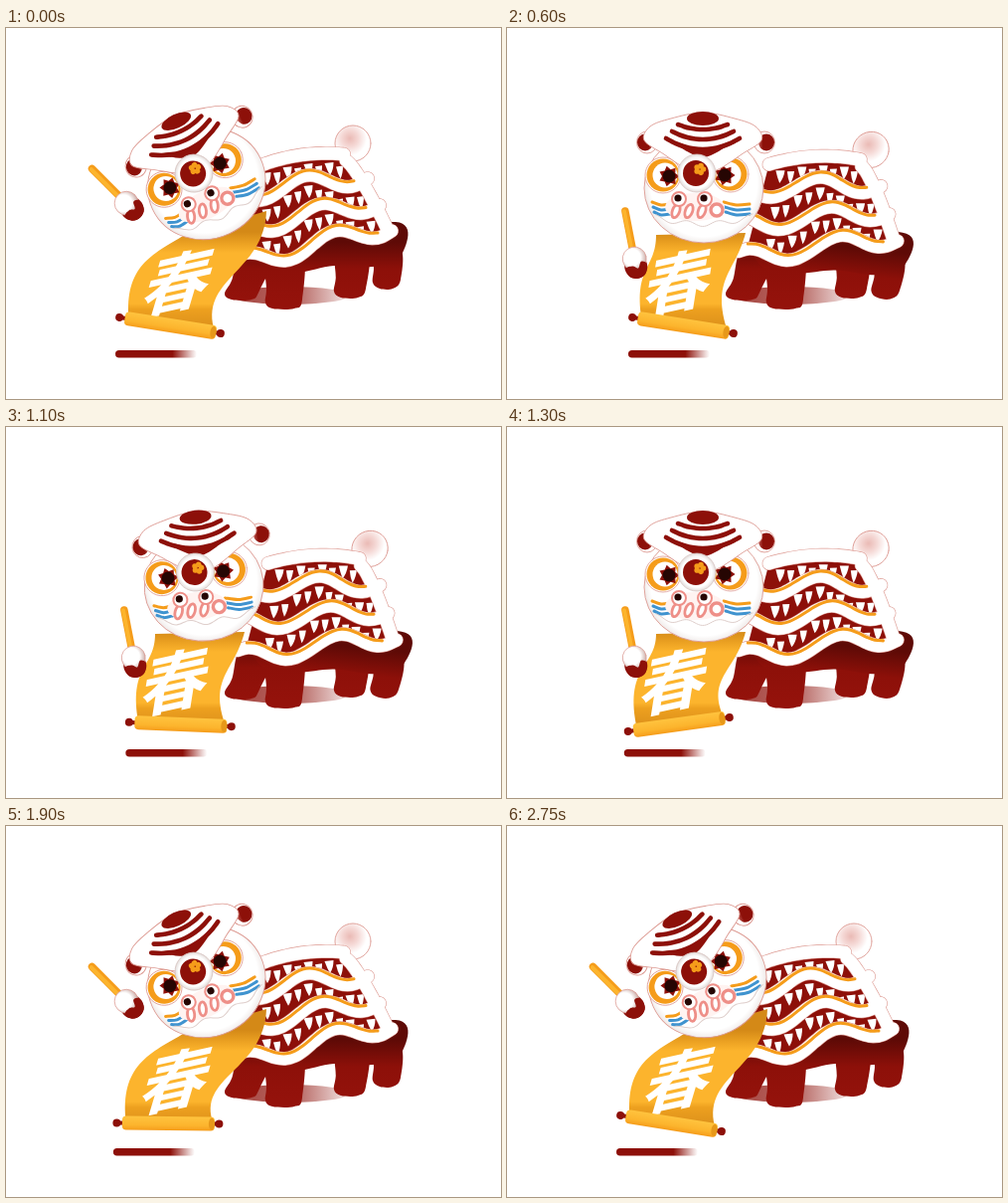
An HTML page with a canvas for the animation above (2800 ms loop, 498 px wide and 373 px high).

```html
<!DOCTYPE html>
<html lang="zh">
<head>
<meta charset="utf-8">
<title>Lion dance</title>
<style>
  html, body { margin: 0; width: 100%; height: 100%; overflow: hidden; background: #fff; }
  canvas { display: block; width: 498px; height: 373px; }
</style>
</head>
<body>
<canvas id="stage" width="498" height="373"></canvas>
<script>
const ctx = document.getElementById('stage').getContext('2d');
const LOOP = 2800, STEP = 50, TAU = Math.PI * 2, DEG = Math.PI / 180;
const RED = '#8d1009', DARK = '#5e0a06', GOLD = '#fcb42d', ORANGE = '#f59c1a';
const PINK = '#ee8f88', RIM = '#dd9a92', BLUE = '#3f93cf', BLACK = '#260603';

const mix = (a, b, k) => a + (b - a) * k;

function ease(t, from, to) {
  const u = Math.min(1, Math.max(0, (t - from) / (to - from)));
  return u * u * (3 - 2 * u);
}

// The lion stands up, shakes its head once, and leans back; the scroll swings behind it.
function poseAt(t) {
  const up = ease(t, 0, 600) - ease(t, 1350, 1900);
  const headUp = ease(t, 0, 600) - ease(t, 1600, 1900);
  const shake = Math.sin(Math.PI * Math.min(1, Math.max(0, (t - 600) / 650))) ** 2;
  const swing = Math.exp(-(((t - 1520) / 370) ** 2));
  return { up, headUp, swing, headAngle: -25 * (1 - headUp) - 14 * shake, rollX: 165 + 12 * up - 6 * swing };
}

function group(draw) {
  ctx.save();
  draw();
  ctx.restore();
}

function paint(fill, stroke, width = 1) {
  if (fill) { ctx.fillStyle = fill; ctx.fill(); }
  if (stroke) { ctx.strokeStyle = stroke; ctx.lineWidth = width; ctx.stroke(); }
}

// Smooth curve through points.
function curve(p, closed) {
  const n = p.length, at = i => closed ? p[(i + n) % n] : p[Math.max(0, Math.min(n - 1, i))];
  ctx.beginPath();
  ctx.moveTo(...p[0]);
  for (let i = 0; i < (closed ? n : n - 1); i++) {
    const [a, b, c, d] = [at(i - 1), at(i), at(i + 1), at(i + 2)];
    ctx.bezierCurveTo(b[0] + (c[0] - a[0]) / 6, b[1] + (c[1] - a[1]) / 6,
      c[0] - (d[0] - b[0]) / 6, c[1] - (d[1] - b[1]) / 6, c[0], c[1]);
  }
}

function blob(points, fill, stroke, width) { curve(points, true); paint(fill, stroke, width); }
function line(points, color, width) { curve(points); paint(null, color, width); }

function plot(from, to, f, count = 16) {
  return Array.from({ length: count + 1 }, (_, i) => {
    const x = mix(from, to, i / count);
    return [x, f(x)];
  });
}

function oval(x, y, rx, ry, fill, stroke, width) {
  ctx.beginPath();
  ctx.ellipse(x, y, rx, ry, 0, 0, TAU);
  paint(fill, stroke, width);
}
const disc = (x, y, r, fill, stroke, width) => oval(x, y, r, r, fill, stroke, width);

function shaded(gradient, stops) {
  stops.forEach(([at, color]) => gradient.addColorStop(at, color));
  return gradient;
}
const linear = (x0, y0, x1, y1, ...stops) => shaded(ctx.createLinearGradient(x0, y0, x1, y1), stops);
const radial = (x, y, r, ...stops) => shaded(ctx.createRadialGradient(x, y, 0, x, y, r), stops);

function drawShadows(x) {
  ctx.beginPath();
  ctx.roundRect(x, 324, 82, 7.5, 4);
  paint(linear(x, 0, x + 82, 0, [0, RED], [0.7, RED], [0.95, 'rgba(141,16,9,.15)'], [1, 'rgba(141,16,9,0)']));
  oval(285, 269, 60, 9, linear(225, 0, 345, 0, [0, 'rgba(141,16,9,.8)'], [0.6, 'rgba(141,16,9,.6)'], [1, 'rgba(141,16,9,.1)']));
}

function drawLeg(x, width, foot, lean, skin) {
  const left = x - lean, right = left + width;
  blob([[x, 222], [left + lean * 0.4, foot - 20], [left - 1, foot - 6], [left + 6, foot],
    [right - 8, foot], [right, foot - 9], [x + width, 222]], skin);
}

// Wavy hem of a tier of the coat; each lower tier is steeper and reaches further back.
const tierWave = k => x =>
  165 + 34 * k - (0.15 + 0.05 * k) * (x - 250) - 9 * Math.cos((x - 302 - 14 * k) / 90 * TAU);
const tierEnd = k => 364 + 12 * k;

function drawFringe(wave, from, to, drop) {
  for (let x = from, i = 0; x < to; x += 10.5, i++) {
    const y = wave(x) + drop + (i % 2 ? 3 : 0), s = 4.5 - i % 2;
    ctx.beginPath();
    ctx.moveTo(x - s, y - 4);
    ctx.lineTo(x + s, y - 5);
    ctx.quadraticCurveTo(x + s, y + 3, x + 1, y + 8);
    ctx.quadraticCurveTo(x - 2, y + 3, x - s, y - 4);
    paint('#fff');
  }
}

function drawBody(up) {
  const skin = linear(0, 215, 0, 275, [0, DARK], [0.45, RED], [1, '#94120b']);
  drawLeg(237, 34, 273, 16, skin);
  drawLeg(333, 31, 271, 2, skin);
  drawLeg(262, 36, 282, 0, skin);
  ctx.transform(1, 0.1 * up, -0.14 * up, 1, 0.14 * 238 * up, -0.1 * 285 * up);
  drawLeg(370, 27, 262, 0, skin);
  blob([[258, 222], [392, 195], [396, 232], [368, 240], [330, 239], [294, 246], [262, 246]], skin);

  const back = x => 126 + 0.0028 * (x - 322) ** 2;
  const spine = plot(250, 340, back);
  const side = plot(0, 1, u => u).map(([u]) => [342 + 42 * u ** 0.8, 133 + 70 * u]);
  ctx.beginPath();
  for (const p of [...spine, ...side, ...plot(tierEnd(2), 240, tierWave(2))]) ctx.lineTo(...p);
  paint(RED);
  disc(349, 116, 18, radial(346, 111, 19, [0, '#eabab5'], [0.45, '#f5d9d6'], [0.9, '#fff'], [1, '#fff']), RIM, 0.9);

  const edges = [spine, side];
  drawFringe(back, 262, 350, 14);
  for (let k = 0; k < 3; k++) {
    const wave = tierWave(k);
    if (k < 2) drawFringe(wave, 262, tierEnd(k) - 2, 15);
    const hem = plot(232, tierEnd(k), wave);
    edges.push(hem);
  }
  for (const e of edges) line(e, RIM, 14);
  for (const e of edges) line(e, '#fff', 12.8);
  for (let k = 0; k < 3; k++) line(plot(240, tierEnd(k) - 14, x => tierWave(k)(x) - 5), ORANGE, 3);
}

function drawBanner({ up, headUp, swing, rollX }) {
  const y = 299, angle = 9 - 24 * swing, sway = 4 * (1 - up) - 9 * swing;
  const c = Math.cos(angle * DEG), s = Math.sin(angle * DEG);
  const left = [rollX - 42 * c, y - 42 * s], right = [rollX + 46 * c, y + 46 * s];
  ctx.beginPath();
  ctx.moveTo(mix(180, 150, headUp), 208);
  ctx.bezierCurveTo(mix(146, 150, headUp), mix(228, 242, headUp), left[0] + sway - 8, 240, ...left);
  ctx.lineTo(...right);
  ctx.bezierCurveTo(right[0] - 18, 252, mix(260, 230, headUp), 246, mix(262, 240, headUp), mix(184, 206, headUp));
  ctx.closePath();
  paint(linear(0, 205, 0, 300, [0, '#d48917'], [0.13, '#eda323'], [0.22, GOLD], [0.76, GOLD], [0.82, '#eda01f'], [1, '#dd911b']));

  group(() => {
    ctx.translate(rollX + 9 - 13 * up, 256);
    ctx.transform(1, -0.22, mix(-0.3, -0.16, headUp), 1, 0, 0);
    ctx.font = '700 68px "Noto Sans CJK SC", "Noto Sans CJK", sans-serif';
    ctx.textAlign = 'center';
    ctx.fillStyle = '#fff';
    ctx.fillText('春', 0, 25);
  });

  ctx.translate(rollX, y);
  ctx.rotate(angle * DEG);
  line([[-51, 0], [51, 0]], RED, 4);
  for (const side of [-1, 1]) disc(side * 51.5, 0, 4, RED);
  ctx.beginPath();
  ctx.roundRect(-46, -7, 93, 14, 4);
  paint(linear(0, -7, 0, 7, [0, '#ffc33e'], [0.65, GOLD], [1, ORANGE]));
  oval(44, 0, 3, 6, '#e79819');
}

function drawEye(x, y, side) {
  disc(x, y, 18, '#fff', RIM, 0.8);
  disc(x, y, 16.5, ORANGE);
  disc(x + side * 2, y, 12.5, '#fff');
  const lashes = Array.from({ length: 14 }, (_, i) => {
    const r = i % 2 ? 7 : 10.5, a = i / 14 * TAU;
    return [x + side * 6 + r * Math.cos(a), y + 1 + r * Math.sin(a)];
  });
  ctx.beginPath();
  lashes.forEach(p => ctx.lineTo(...p));
  paint(RED);
  disc(x + side * 6, y + 1, 6.5, BLACK);
}

// White brows rising to two horns, with the striped hat between them.
function drawCrest() {
  const half = [[165, 91], [144, 99], [138, 113], [158, 127], [181, 142]];
  const mirrored = half.map(([x, y]) => [394 - x, y]).reverse();
  blob([[197, 85], ...half, [197, 146], ...mirrored], '#fff', RIM, 0.9);
  oval(197, 91, 16, 7, RED);
  for (let i = 0; i < 3; i++) {
    const w = 25 + 6 * i, y = 97 + 7 * i, sag = 5 + 3 * i;
    line(plot(-1, 1, u => u, 8).map(([u]) => [197 + w * u, y + sag * (1 - u * u)]), RED, 4.6);
  }
  blob([[168, 114], [197, 122], [226, 114], [213, 124], [197, 130], [181, 124]], RED);
}

function drawMuzzle() {
  for (const [x, width] of [[146, 18], [218, 26]]) {
    [ORANGE, BLUE, BLUE].forEach((color, i) => {
      const y = 175 + 5 * i;
      line([[x + i, y], [x + width / 2, y + 3], [x + width, y + 2]], color, 3);
    });
  }
  oval(189, 180, 30, 14, '#fff3f1');
  for (let i = 0; i < 3; i++) {
    group(() => {
      ctx.translate(170 + 13 * i, 184);
      ctx.rotate(0.35);
      oval(0, 0, 3.6, 7, '#fff', PINK, 2.8);
    });
  }
  disc(211, 183, 6, '#fff', PINK, 3.4);
  for (const x of [173, 199]) {
    disc(x, 172, 7, '#fff', PINK, 2);
    disc(x - 1, 171, 3.6, BLACK);
  }
  line(plot(150, 247, x => 197 + 2.5 * Math.cos((x - 197) / 32 * TAU) - ((x - 197) / 18) ** 2, 24), '#dfcfcc', 1);
}

function drawHead(angle) {
  ctx.translate(191 + angle * 0.06, 147);
  ctx.rotate(angle * DEG);
  ctx.translate(-191, -147);
  for (const side of [-1, 1]) {
    const x = 200 + side * 59;
    oval(x, 115, 10.5, 11, '#fff', RIM, 0.9);
    oval(x + side * 2, 115, 8, 8.5, linear(x - side * 8, 0, x + side * 5, 0, [0, '#cf7770'], [0.5, RED]));
  }
  oval(198, 161, 60, 55, radial(198, 156, 64, [0, '#fff'], [0.84, '#fff'], [1, '#e9e2e0']), RIM, 0.9);
  drawEye(157, 148, 1);
  drawEye(225, 147, -1);
  drawMuzzle();
  drawCrest();
  disc(191, 146, 19, radial(191, 146, 20, [0, '#fff'], [0.75, '#fff'], [1, '#ddd5d3']), '#d8c5c2', 0.8);
  disc(190, 146, 13, RED);
  for (let i = 0; i < 5; i++) disc(194 + 3.5 * Math.cos(i * TAU / 5), 142 + 3.5 * Math.sin(i * TAU / 5), 2.8, ORANGE);
}

function drawHand(up) {
  ctx.translate(mix(124, 129, up), mix(179, 236, up));
  ctx.rotate(mix(-45, -11, up) * DEG);
  line([[0, -13], [0, -53]], ORANGE, 7.5);
  line([[-1, -14], [-1, -53]], GOLD, 4);
  oval(0, 4, 11.5, 12, RED);
  disc(0, -4, 12, radial(-2, -6, 14, [0, '#fff'], [0.6, '#fff'], [1, '#cfb2ad']), RIM, 0.7);
  blob([[-10, 4], [-3, 3], [2, 6], [6, 0], [11, 3], [8, 13], [0, 16], [-8, 13]], RED);
}

function render(now) {
  const pose = poseAt(Math.floor(now % LOOP / STEP) * STEP);
  ctx.fillStyle = '#fff';
  ctx.fillRect(0, 0, 498, 373);
  ctx.lineCap = ctx.lineJoin = 'round';
  drawShadows(pose.rollX - 55);
  group(() => drawBody(pose.up));
  group(() => drawBanner(pose));
  group(() => drawHead(pose.headAngle));
  group(() => drawHand(pose.up));
}

let start;
function tick(now) {
  start ??= now;
  render(now - start);
  requestAnimationFrame(tick);
}
render(0);
requestAnimationFrame(tick);
</script>
</body>
</html>
```
